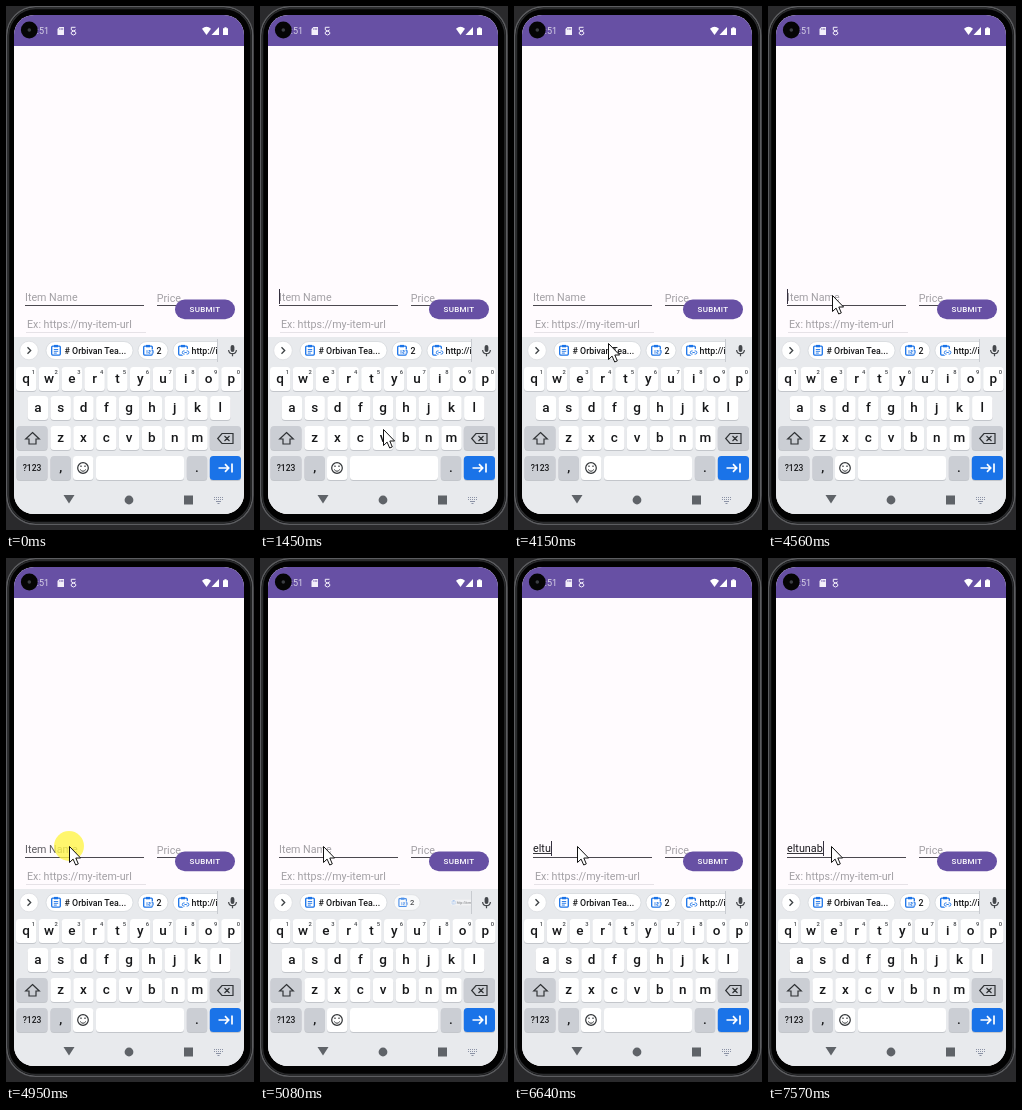
Animation, 248 px wide and 524 px high, one loop 8000 ms. Source, as an HTML page:

```html
<!DOCTYPE html>
<html lang="en">
<head>
<meta charset="utf-8">
<title>Add item form</title>
<style>
html, body { margin: 0; width: 100%; height: 100%; overflow: hidden; background: #2a2a2c; }
svg { position: absolute; left: 0; top: 0; display: block; }
text { font-family: Roboto, sans-serif; }
.hint { font-size: 10.7px; fill: #a3a0a5; }
.med { font-weight: 500; }
.loop, .type, .mark, .caret, .caret i { animation: 8s step-end infinite; }

.pointer { animation-name: move; }
@keyframes move {
  0% { transform: translate(112px, 468px); opacity: 0; }
  5.75% { transform: translate(112px, 468px); opacity: 1; }
  6.875% { transform: translate(118px, 443px); }
  8% { transform: translate(122px, 428px); }
  9.125% { transform: translate(123px, 423px); }
  50.125% { transform: translate(118px, 408px); }
  51% { transform: translate(107px, 373px); }
  51.875% { transform: translate(94px, 337px); }
  52.75% { transform: translate(84px, 316px); }
  53.625% { transform: translate(76px, 303px); }
  54.375% { transform: translate(70px, 295px); }
  55.25% { transform: translate(66px, 291px); }
  56% { transform: translate(64px, 289px); }
  57.75%, 100% { transform: translate(63px, 288px); opacity: 1; }
}
.click { animation-name: click; }
@keyframes click { 0%, 62.625%, 100% { opacity: 0; } 60.25% { opacity: .8; } }

.name { animation-name: name; }
@keyframes name {
  0% { fill: #a3a0a5; opacity: 1; }
  61.875% { fill: #615f64; }
  62.625% { fill: #a3a0a5; opacity: 1; }
  74.5%, 100% { fill: #a3a0a5; opacity: 0; }
}

.chip2 { transform-origin: 147px 344.5px; animation-name: chip2; }
@keyframes chip2 {
  0%, 64.375%, 100% { transform: none; opacity: 1; }
  62.625% { transform: scale(.5); opacity: .3; }
  63.5% { transform: scale(.87); opacity: .75; }
}
.chip3 { transform-origin: 203px 344.5px; animation-name: chip3; }
@keyframes chip3 {
  0%, 65.25%, 100% { transform: none; opacity: 1; }
  62.625% { transform: scale(.1); opacity: 0; }
  63.5% { transform: scale(.36); opacity: .45; }
  64.375% { transform: scale(.8); opacity: .8; }
}

.type, .mark, .caret { position: absolute; left: 19px; }
.type { top: 283px; height: 16px; overflow: hidden; white-space: pre; color: #1d1b20;
  font: 10.8px/16px Roboto, sans-serif; animation-name: type; }
.mark { top: 295px; height: 1px; background: #38363b; animation-name: mark; }
.caret { top: 283px; height: 15px; animation-name: type; }
.caret i { position: absolute; right: -1px; top: 0; width: 1px; height: 15px; background: #35303f;
  animation-name: blink; }
@keyframes type {
  0% { width: 0; }
  74.5% { width: 6px; }
  77.125% { width: 8.5px; }
  78.75% { width: 12px; }
  82.125% { width: 18px; }
  86.375% { width: 24px; }
  88.875% { width: 30px; }
  91.375%, 100% { width: 36px; }
}
@keyframes mark {
  0% { width: 0; }
  74.5% { width: 6px; }
  77.125% { width: 8.5px; }
  78.75% { width: 12px; }
  83% { width: 18px; }
  86.375% { width: 24px; }
  89.625% { width: 30px; }
  94.625%, 100% { width: 36px; }
}
@keyframes blink {
  0%, 12.375%, 25%, 36.625%, 50.125%, 61.875% { opacity: 0; }
  5.75%, 18.125%, 30.625%, 43.5%, 56%, 68.625%, 100% { opacity: 1; }
}
</style>
</head>
<body>
<svg width="248" height="524" viewBox="0 0 248 524">
  <defs>
    <clipPath id="screen"><rect x="8" y="9" width="230" height="499" rx="20"/></clipPath>
    <clipPath id="strip"><rect x="38" y="331" width="173" height="27"/></clipPath>
    <g id="board" fill="none" stroke="#1a73e8" stroke-width="1.3">
      <rect x=".7" y="1.6" width="8.6" height="9" rx="1"/>
      <path d="M3 1.6H7" stroke-width="2.4"/>
    </g>
    <path id="lines" d="M2.8 5H7.2M2.8 6.8H7.2M2.8 8.6H5.8" stroke="#1a73e8" stroke-width=".9"/>
    <g id="digits">
      <rect x="2.6" y="5" width="8.6" height="4.6" fill="#fff"/>
      <path d="M4 5.6V9.2M5.6 6H7.2V7.4H5.8V8.8H7.4M8.6 6H10.2V8.8H8.6M8.8 7.4H10.2" fill="none" stroke="#1a73e8" stroke-width=".8"/>
    </g>
    <g id="link">
      <circle cx="7.6" cy="8" r="3.9" fill="#fff"/>
      <path d="M6.6 6.4H5.9A1.6 1.6 0 0 0 5.9 9.6H6.6M8.6 6.4H9.3A1.6 1.6 0 0 1 9.3 9.6H8.6M6.4 8H8.8" fill="none" stroke="#1a73e8" stroke-width=".9"/>
    </g>
  </defs>

  <rect x=".75" y=".75" width="246" height="517.5" rx="29" fill="#000" stroke="#5c5d60" stroke-width="1.5"/>
  <rect x="2.5" y="2.5" width="242.5" height="514" rx="27" fill="#020202" stroke="#2b2c2e" stroke-width="1.5"/>

  <g clip-path="url(#screen)">
    <rect x="8" y="9" width="230" height="499" fill="#fffbfe"/>
    <rect x="8" y="9" width="230" height="31" fill="#6750a4"/>
    <rect x="8" y="331" width="230" height="177" fill="#e8eaed"/>

    <text x="30.8" y="28" font-size="9" fill="#fff" opacity=".75">:51</text>
    <circle cx="23.3" cy="24" r="8.4" fill="#050505"/>
    <circle cx="23.3" cy="24" r="1.8" fill="#3c3e43"/>
    <path d="M53.4 21H58V29H51.5V23Z" fill="#f3effa"/>
    <path d="M53.8 22V24M55.3 22V24M56.7 22V24" stroke="#6750a4" stroke-width=".6"/>
    <path d="M69.5 21.3H65.3V23.8L67.5 25L69.7 26.2V28L67.5 29L65.3 28V26.2L67.5 25L69.7 23.8" fill="none" stroke="#f3effa"/>
    <path d="M196 22.8Q200.5 18.8 205 22.8L200.5 29Z" fill="#fff"/>
    <path d="M213 21V29H205.5Z" fill="#fff"/>
    <path d="M217 22.3H218.4V21.3H220.6V22.3H222V29H217Z" fill="#fff"/>

    <text class="hint loop name" x="19" y="295">Item Name</text>
    <text class="hint" x="150.7" y="295.5">Price</text>
    <text class="hint" x="21" y="322">Ex: https://my-item-url</text>
    <path d="M19 299.5H138M151 299.5H190" stroke="#4b484f"/>
    <path d="M20 326.5H140" stroke="#e6e2e7"/>
    <rect x="169" y="293.6" width="60" height="19.6" rx="9.8" fill="#6750a4"/>
    <text class="med" x="199" y="306.4" font-size="8" letter-spacing=".3" text-anchor="middle" fill="#fff">SUBMIT</text>

    <circle cx="23" cy="344.5" r="9.3" fill="#fff" stroke="#dadce0" stroke-width=".7"/>
    <path d="M21.5 341.3L24.7 344.5L21.5 347.7" fill="none" stroke="#3c4043" stroke-width="1.3"/>
    <g clip-path="url(#strip)" fill="#17181a" font-size="8.8" class="med" id="chips"></g>
    <path d="M211.5 333V356" stroke="#c8cbd0"/>
    <g fill="none" stroke="#44474b" stroke-width="1.2">
      <rect x="224.6" y="339" width="3.8" height="7" rx="1.9" fill="#44474b" stroke="none"/>
      <path d="M222.6 344Q222.8 347.7 226.5 347.7T230.4 344M226.5 347.7V350.3"/>
    </g>

    <g id="keys"></g>
    <g fill="none" stroke="#303336" stroke-width="1.2">
      <path d="M26.5 426.5L33.3 433H30V438H23V433H19.7Z"/>
      <path d="M216 427.5H227V437.5H216L211.7 432.5ZM218.5 430L223.5 435M223.5 430L218.5 435"/>
      <circle cx="77" cy="462" r="5.3"/>
      <path d="M74.2 463.5Q77 467 79.8 463.5" stroke-width="1"/>
      <path d="M75 459.6V461M79 459.6V461"/>
      <path d="M212.5 462H222.5M219 458.2L222.7 462L219 465.8M226 457.5V466.5" stroke="#fff" stroke-width="1.7"/>
    </g>

    <g fill="#5f6368">
      <path d="M57.5 489H68.5L63 497.5Z"/>
      <circle cx="123" cy="494" r="4.4"/>
      <rect x="178" y="489.5" width="9" height="9"/>
    </g>
    <g fill="none" stroke="#8b92a5">
      <path d="M208 491.5H217M208 493.5H217" stroke-dasharray="1 1"/>
      <path d="M210 495.5H215"/>
      <path d="M211.5 497.5H213.5"/>
    </g>
  </g>
</svg>

<div class="type">eltunab</div>
<div class="mark"></div>
<div class="caret"><i></i></div>

<svg width="248" height="524" viewBox="0 0 248 524">
  <circle class="loop click" cx="63" cy="288" r="15" fill="#fff64a"/>
  <path class="loop pointer" d="M.5 .5V16.5L4.1 13.1L6.7 19L9.3 17.9L6.8 12H11.6Z" fill="#fff" stroke="#111" stroke-width="1" stroke-linejoin="round"/>
</svg>

<script>
const keys = [];

function key(x, y, w, label = "", fill = "#fff", size = 13.5) {
  keys.push(`<rect x="${x}" y="${y + 1}" width="${w}" height="24" rx="3.5" fill="#c3c6cb"/>
    <rect x="${x}" y="${y}" width="${w}" height="24" rx="3.5" fill="${fill}"/>
    <text class="med" x="${x + w / 2}" y="${y + (size < 10 ? 15 : 16.2)}" font-size="${size}" text-anchor="middle" fill="#17181a">${label}</text>`);
}

function row(letters, x, y, digits = "") {
  [...letters].forEach((c, i) => {
    const left = x + i * 22.8;
    key(left, y, 20.4, c);
    if (digits) keys.push(`<text class="med" x="${left + 17.3}" y="${y + 6.6}" font-size="5.8" text-anchor="middle" fill="#44474b">${digits[i]}</text>`);
  });
}

function chip(x, w, label, icon, name = "") {
  return `<g class="loop ${name}">
    <rect x="${x}" y="335.5" width="${w}" height="18" rx="9" fill="#fff" stroke="#d5d8dc" stroke-width=".8"/>
    <use href="#board" x="${x + 5}" y="338.5"/>
    <use href="#${icon}" x="${x + 5}" y="338.5"/>
    <text x="${x + 18.5}" y="347.8">${label}</text></g>`;
}

const grey = "#cbced4";
row("qwertyuiop", 10, 361, "1234567890");
row("asdfghjkl", 21.7, 390);
row("zxcvbnm", 44.5, 420);
key(10.5, 420, 31, "", grey);
key(203.8, 420, 31.2, "", grey);
key(10.5, 450, 31, "?123", grey, 8.5);
key(44.5, 450, 20.4, ",", grey);
key(67, 450, 20.4);
key(90, 450, 88);
key(180.8, 450, 20.4, ".", grey);
key(203.8, 450, 31.2, "", "#1a73e8");
document.getElementById("keys").innerHTML = keys.join("");
document.getElementById("chips").innerHTML =
  chip(40, 87, "# Orbivan Tea...", "lines") +
  chip(132, 30, "2", "digits", "chip2") +
  chip(167, 72, "http://item", "link", "chip3");
</script>
</body>
</html>
```
